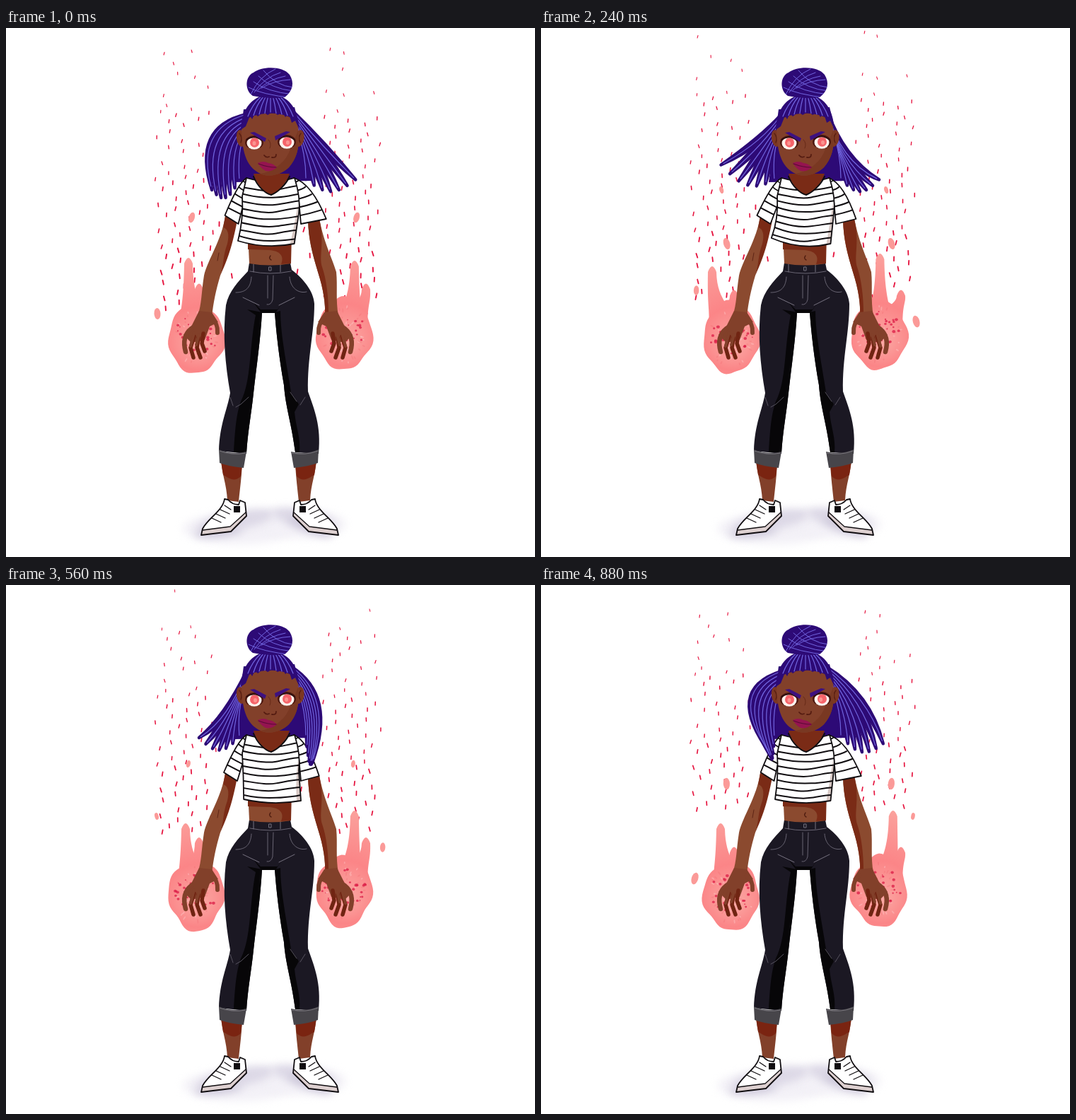
These frames come from a looping animation (748 by 748 pixels, 960 ms). An HTML page with a canvas:

```html
<!DOCTYPE html>
<html lang="en">
<head>
<meta charset="utf-8">
<title>Fire hands</title>
<style>
html, body { margin: 0; width: 100%; height: 100%; overflow: hidden; background: #fff; }
canvas { display: block; width: 748px; height: 748px; }
</style>
</head>
<body>
<canvas id="stage" width="748" height="748"></canvas>
<script>
const c = document.getElementById('stage').getContext('2d');
const STEP = 80, STEPS = 12;
const INK = '#100d10', HAIR = '#2d0a76', SHEEN = '#7165df';
const SKIN = '#82402a', LIT = '#8b4a2f', SHADE = '#702412', DARK = '#7a2b16';

const mix = (a, b, t) => a + (b - a) * t;
const rand = n => { const v = Math.sin(n * 127.1 + 3.7) * 43758.5453; return v - Math.floor(v); };
// Swing around a mean, furthest out at the peak step.
const swing = (step, mean, size, peak, cycles = 1) =>
  mean + size * Math.cos((step - peak) * cycles * 2 * Math.PI / STEPS);

function fill(d, color) { c.fillStyle = color; c.fill(new Path2D(d)); }
function line(d, color, width) {
  c.strokeStyle = color; c.lineWidth = width; c.stroke(new Path2D(d));
}
function oval(x, y, rx, ry, color, turn = 0) {
  c.fillStyle = color; c.beginPath(); c.ellipse(x, y, rx, ry, turn, 0, 7); c.fill();
}
function clipped(d, draw) {
  c.save(); c.clip(new Path2D(d)); draw(); c.restore();
}
// Draw once as is and once flipped; sum is left x + right x.
function pair(sum, draw) {
  draw();
  c.save(); c.transform(-1, 0, 0, 1, sum, 0); draw(); c.restore();
}

function shadow() {
  c.save();
  c.filter = 'blur(6px)';
  oval(330, 708, 80, 22, '#f3f1f7');
  oval(425, 702, 55, 20, '#f3f1f7');
  oval(325, 697, 56, 13, '#dcd8e6', -.2);
  oval(420, 693, 46, 12, '#dcd8e6', .2);
  oval(300, 713, 34, 6, '#cdc8da', -.1);
  oval(430, 706, 34, 7, '#cdc8da', .35);
  c.restore();
}

function tongue(x, y, base, color) {
  fill(`M${base - 18} 425C${base - 17} 392 ${x - 7} 395 ${x - 6} ${y + 8}` +
       `Q${x} ${y - 8} ${x + 6} ${y + 8}C${x + 7} 390 ${base + 17} 390 ${base + 18} 425Z`, color);
}

function flame(step, side) {
  const x = side ? 478 : 269, y = side ? 433 : 438, seed = side * 50 + 1;
  const glow = c.createRadialGradient(x + 3, y + 12, 4, x, y - 15, 105);
  glow.addColorStop(0, '#fba6a2'); glow.addColorStop(.4, '#fb8587'); glow.addColorStop(1, '#fba39e');
  c.fillStyle = glow;
  c.beginPath();
  for (let i = 0; i < 72; i++) {
    const a = i * Math.PI / 36;
    const r = 1 + .03 * Math.sin(3 * a + step * 2.1 + seed) + .03 * Math.sin(7 * a - step * 1.7) + .03 * Math.cos(4 * a);
    c.lineTo(x + 39 * r * Math.cos(a), y + 50 * r * Math.sin(a));
  }
  c.fill();
  const tx = side ? swing(step, 490, 11, 9.5) : swing(step, 250, 8, 0, 2);
  const ty = side ? swing(step, 319, -10, 2, 3) : swing(step, 337, 12, 2, 3);
  tongue(tx, ty, mix(tx, x, .5), glow);
  tongue(side ? 509 : 273, swing(step, 366, 9, 4, 2), mix(side ? 509 : 273, x, .5), glow);

  for (let i = 0; i < 75; i++) {
    const k = seed + i * 3 + step * 211, a = rand(k) * 6.3, r = Math.sqrt(rand(k + 1)) * .85;
    const px = x + 37 * r * Math.cos(a), py = y + 48 * r * Math.sin(a), s = rand(k + 2);
    if (i < 42) oval(px, py, 1.2 + s * 2, 1, i % 2 ? '#ffffff38' : '#ef626c40', a);
    else oval(px, mix(py, y - 12, .3), .8 + s * 1.7, .8 + s * 1.4, '#dc2049c8');
  }
}

// Loose flames: two rise above each hand, one drifts up outside it.
function wisps(step) {
  for (let side = 0; side < 2; side++) for (let i = 0; i < 3; i++) {
    const outer = i > 1, span = outer ? 10 : 6, x = outer ? 217 + side * 313 : 259 + side * 233;
    const age = (step + 14 - (outer ? side : i) * 4) % STEPS;
    if (age >= span) continue;
    const y = (outer ? 426 : 294 + i * 24) - age * (outer ? 11 : 13), s = 1 - age / span * .5;
    oval(x + Math.sin(age + i) * 4, y, 5 * s, 9 * s, '#fb9a98', Math.sin(step + x) * .3);
  }
}

// Each lane repeats every loop, so the stream rises without a seam.
function sparks(step) {
  for (let side = 0; side < 2; side++) for (let i = 0; i < 27; i++) {
    const k = side * 400 + i * 17 + 11, inner = i > 23;
    const start = (inner ? 360 : 408) - (i * .618 + side * .3) % 1 * 96;
    const life = inner ? .7 : 1.5 + rand(k + 1) * 2.4;
    const x = inner ? mix(306, 416, side) + (i - 24) * 5 : mix(213, 447, side) + (i + rand(k)) * 3.3;
    for (let age = step / STEPS; age < life; age++) {
      const s = 1 - age * .13, tilt = (rand(k + Math.floor(age)) - .5) * 4;
      line(`M${x + 5 * Math.sin(age * 2.3 + i)} ${start - 96 * age}l${tilt * s} ${-6 * s}`, '#e6143f', 1.9 * s);
    }
  }
}

function hand() {
  fill('M273 400L291 402L300 416L288 422L281 441L262 445L251 434L263 420Z', SKIN);
  line('M266 436L261 452L265 466M272 438L270 452L275 466M279 432L277 446L281 457', SHADE, 5.5);
  line('M262 425Q248 436 254 458', SKIN, 6.5);
  line('M266 431L261 450M273 433L269 448', SKIN, 4);
  line('M291 411Q300 418 299 431', SKIN, 6);
}

function arms() {
  fill('M310 266C305 300 285 328 280 350C276 375 277 390 271 407L291 409C293 388 297 370 303 350C312 325 318 310 326 272Z', LIT);
  fill('M310 266L307 282C314 284 316 292 313 305C306 325 309 330 303 350C314 326 320 308 327 272Z', DARK);
  line('M301 318L299 329', '#5e2415', 1);
  fill('M427 272C428 300 433 318 441 345C449 370 452 390 451 408L470 407C466 385 469 365 467 345C460 322 450 305 443 270Z', LIT);
  fill('M427 272C428 300 433 318 441 345C449 370 452 390 451 408L456 404C456 380 453 355 447 338C442 322 451 304 443 270Z', DARK);
  pair(741, hand);
}

function ankle() {
  fill('M304 610L334 615C333 636 331 650 329 670L313 668C312 645 305 630 304 610Z', SKIN);
  fill('M304 612L334 617L332 634C322 643 315 636 307 632Z', '#7a2411');
}

function cuff() {
  fill('M301 596Q320 604 340 599L336 622Q315 620 302 615Z', '#47454a');
  line('M302 598Q320 605 339 601', '#77747b', 1);
}

function legs() {
  pair(743, ankle);
  fill('M344 332L402 332L404 342C420 354 435 372 436 390C436 432 426 465 427 514C436 540 446 562 442 602L409 600C404 560 395 535 393 505C386 465 382 430 380 402L362 402C360 440 354 480 350 516C347 545 342 570 340 602L301 598C302 560 313 540 317 516C310 475 306 435 311 392C315 372 329 358 342 344Z', '#1b1823');
  fill('M341 398L362 402C360 440 354 480 350 516C347 545 342 570 340 600L322 600C324 565 326 545 332 528C347 500 344 450 353 406Z', '#070608');
  fill('M380 402L388 400C388 435 398 480 403 515L414 532L408 543C410 565 417 580 415 600L409 600C404 560 395 535 393 505C386 465 382 430 380 402Z', '#070608');
  fill('M349 387L360 398L384 398L392 387L381 403H361Z', '#070608');
  line('M345 344Q374 350 403 344M378 350L377 384Q375 392 369 391M370 350V382M347 352C346 370 336 374 325 374M401 352C402 368 414 376 425 373', '#696573', 1);
  line('M350 334V345M388 334V345M372 338h3v5h-3zM358 392L335 381M386 392L408 381', '#777381', 1);
  line('M317 522L321 534M343 522L332 532L325 536M402 515L411 528M423 522L416 533', '#57535f', 1);
  pair(743, cuff);
}

function shoe() {
  const d = 'M309 666C307 682 285 694 278 708L276 717L318 712L340 690L338 671L331 668L329 674Q320 674 314 667Z';
  fill(d, '#fff');
  fill('M278 710L318 705L339 684L340 690L318 712L276 717Z', '#ddd0d0');
  line(d, INK, 1.8);
  line('M278 710L317 705L339 685M309 675L318 681', INK, 1.3);
  for (let i = 0; i < 3; i++) line(`M${303 - i * 6} ${681 + i * 6}l13 6`, INK, 1.3);
  fill('M322 676h9v9h-9z', INK);
}

// The cuff runs from x,y towards the body.
function sleeve(x, y, left) {
  const out = left ? -1 : 1, px = left ? 340 : 407, ax = left ? 337 : 414;
  const ix = left ? x + 19 : 417, iy = y + (left ? 12 : 7);
  const d = `M${px} 212Q${mix(x, px, left ? .6 : .45)} 220 ${x} ${y}L${ix} ${iy}L${ax} 244Z`;
  fill(d, '#fff');
  clipped(d, () => {
    fill(`M${ax} 238L${ix - out * 8} ${iy - 18}L${ix} ${iy + 3}L${ax - out * 8} 262Z`, '#d8c9c5');
    for (let u = .18; u < 1; u += .18) {
      const ex = mix(x, px - out * 2, u), ey = mix(y, 211, u);
      line(`M${ex + out * 5} ${ey - 3}Q${mix(ex, ix, .5)} ${ey + 3} ${ex - out * 34} ${ey + (left ? 17 : 7)}`, INK, 2);
    }
  });
  line(d, INK, 1.8);
}

function torso(step) {
  const lx = swing(step, 331, 6, 8), rx = swing(step, 412, 5, 7);
  const ly = swing(step, 301, -4, 3), ry = 305, my = 308;
  fill('M342 290H403V333Q374 338 344 333Z', LIT);
  fill('M342 290H404L403 333L389 334C394 322 387 315 372 314L342 313Z', DARK);
  line('M374 322Q371 326 375 328', '#4f1d10', 1.4);
  sleeve(swing(step, 308, -3, 4), 265, true);
  sleeve(swing(step, 447, 6, 11.5), 270, false);
  const d = `M340 212Q374 222 408 212Q417 240 414 262L${rx} ${ry}Q${mix(lx, rx, .5)} ${my * 2 - (ly + ry) / 2} ${lx} ${ly}Q336 270 334 238Z`;
  fill(d, '#fff');
  clipped(d, () => {
    fill(`M413 246L${rx + 4} ${ry}L${rx - 6} ${ry}Q409 275 413 246Z`, '#d8c9c5');
    for (let i = 1; i < 9; i++) {
      const u = i / 8.8, w = Math.sin(i * 2.1 + step) * 1.5;
      const a = mix(212, ly, u), m = mix(218, my, u), b = mix(212, ry, u);
      line(`M322 ${a + w}C350 ${m - w} 365 ${m + 3 + w} 382 ${m + 1}S410 ${b - w} 424 ${b}`, INK, 2);
    }
  });
  line(d, INK, 1.8);
  fill('M350 206C354 222 366 234 375 236C385 232 396 221 401 206Z', DARK);
  line('M350 210C355 223 366 234 375 236C385 232 396 221 401 210', INK, 2);
}

// Braids fan from the outer curve to the inner one; each curve is root, bend, tip.
function braids(outer, inner, sag) {
  const list = [];
  for (let i = 0; i < 7; i++) {
    const u = i / 6, b = outer.map((v, k) => mix(v, inner[k], u));
    b[5] += sag * Math.sin(u * Math.PI);
    list.push(b);
  }
  const at = (b, t, k) => (1 - t) ** 2 * b[k] + 2 * t * (1 - t) * b[2 + k] + t * t * b[4 + k];
  c.fillStyle = HAIR;
  for (let i = 0; i < 6; i++) {
    c.beginPath();
    for (let t = 0; t < .61; t += .06) c.lineTo(at(list[i], t, 0), at(list[i], t, 1));
    for (let t = .6; t > -.01; t -= .06) c.lineTo(at(list[i + 1], t, 0), at(list[i + 1], t, 1));
    c.fill();
  }
  for (const [x, y, p, q, tx, ty] of list) {
    const len = Math.hypot(tx - x, ty - y), nx = (ty - y) / len * 7, ny = (x - tx) / len * 7;
    const lens = `M${x} ${y}Q${p + nx} ${q + ny} ${tx} ${ty}Q${p - nx} ${q - ny} ${x} ${y}Z`;
    fill(lens, HAIR);
    line(lens, HAIR, 4.5);
  }
  for (const b of list) {
    line(`M${b[0]} ${b[1]}Q${b[2]} ${b[3]} ${mix(b[4], b[2], .06)} ${mix(b[5], b[3], .06)}`, SHEEN, 1.2);
  }
}

function hair(step) {
  const tipX = swing(step, 284, -44, 3.8) + swing(step, 0, 16, 3.8, 2);
  braids([340, 122, swing(step, 298, 34, 5), swing(step, 166, 24, 6.5), tipX, swing(step, 216, -26, 4)],
    [338, 150, 327, 172, 330, 215], 18);
  braids([404, 116, swing(step, 448, 25, 9), swing(step, 168, 20, 3), swing(step, 465, 32, .8), swing(step, 230, -22, 1.5)],
    [412, 142, 424, 180, 424, 214], 17);
}

function eye(x, y, step) {
  oval(x, y, 13, 10, '#4b170f');
  oval(x, y + 1, 10.5, 8.8, '#fff4ee');
  oval(x + .5, y, 6.5, 6.8, '#f5646a');
  oval(x + Math.sin(step * 2) * 1.5, y + 1, 2.5, 3, '#fb9490');
  line(`M${x - 11} ${y - 4}Q${x} ${y - 12} ${x + 11} ${y - 3}`, '#32100f', 2);
}

function head(step) {
  oval(332, 156, 6, 12, '#7c3722', -.15);
  oval(415, 156, 6.5, 12, '#7c3722', .15);
  line('M330 149Q335 155 332 162M417 149Q412 155 416 162', '#5a2013', 1.5);
  fill('M333 138C340 116 405 114 413 138C416 165 413 182 400 197C390 207 372 212 360 206C343 198 333 182 333 138Z', SKIN);
  fill('M413 145C415 172 411 184 400 197C390 207 372 212 360 206C378 203 394 190 400 176Z', '#793822');
  eye(351, 162, step);
  eye(397, 161, step + 1);
  fill('M345 148L351 147L368 156L366 161Z', '#3d1180');
  fill('M402 147L396 146L380 153L381 159Z', '#3d1180');
  line('M371 158Q376 163 373 170', '#672918', 1);
  line('M365 180Q368 184 372 182M376 183Q382 184 382 179', '#541b11', 1.8);
  fill('M356 191Q364 187 371 191Q377 191 383 197Q376 204 367 202Q361 199 356 191Z', '#951450');
  line('M357 192Q370 197 382 197', '#590b36', 1.2);

  fill('M332 144C333 112 351 94 374 94C398 94 413 112 415 144L409 131L404 134L400 121L395 126L391 119L384 123L378 118L370 123L364 119L356 125L352 121L348 129L345 124L339 139Z', HAIR);
  for (let i = 0; i < 9; i++) {
    const x = 342 + i * 8, y = 119 + Math.abs(i - 4) * 1.5;
    line(`M${x} ${y}Q${mix(x, 374, .2)} 108 ${mix(x, 374, .55)} 98`, SHEEN, 1.2);
  }
  const bun = 'M349 96C337 88 338 68 350 63C361 54 391 53 401 66C408 77 406 89 394 98Q372 101 349 96Z';
  fill(bun, HAIR);
  clipped(bun, () => {
    for (let i = 0; i < 4; i++) {
      line(`M${346 + i * 5} ${94 - i * 3}Q${358 + i * 7} ${68 + i * 2} ${381 + i * 7} ${58 + i * 5}`, SHEEN, 1);
      line(`M${364 - i * 7} ${60 + i * 8}Q${382 - i * 7} ${82 + i * 4} 406 ${84 + i * 5}`, SHEEN, 1);
    }
  });
}

function draw(step) {
  c.fillStyle = '#fff';
  c.fillRect(0, 0, 748, 748);
  c.lineCap = c.lineJoin = 'round';
  shadow();
  sparks(step);
  flame(step, 0);
  flame(step, 1);
  wisps(step);
  fill('M336 115L408 112L434 216L322 218Z', HAIR);
  arms();
  legs();
  pair(746, shoe);
  torso(step);
  hair(step);
  head(step);
}

let shown = -1;
function tick() {
  const step = Math.floor(performance.now() / STEP) % STEPS;
  if (step !== shown) draw(shown = step);
  requestAnimationFrame(tick);
}
tick();
</script>
</body>
</html>
```
